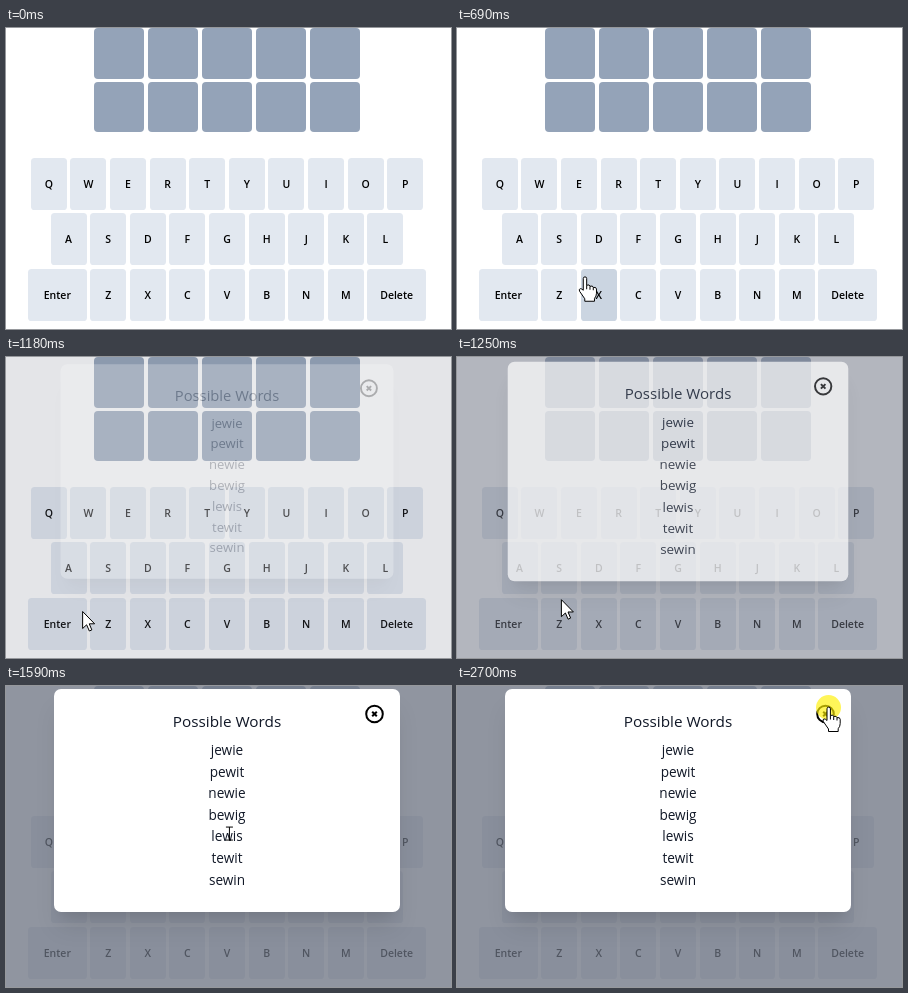
These frames come from a looping animation (445x301 px, 2770 ms). An HTML page:

```html
<!DOCTYPE html>
<html lang="en">
<head>
<meta charset="utf-8">
<title>Possible Words</title>
<style>
  html, body { margin: 0; width: 100%; height: 100%; overflow: hidden; background: #fff; }
  svg { display: block; font-family: "Open Sans", "Noto Sans", sans-serif; text-anchor: middle; }
  .tile { fill: #94a3b8; }
  .key rect { fill: #e2e8f0; }
  .key.hover rect { fill: #cbd5e1; }
  .key text { font-size: 10.5px; font-weight: 600; }
  #dialog { fill: #111827; }
  .title { font-size: 15.3px; font-weight: 500; }
  .word { font-size: 13.6px; }
  .shadow { filter: drop-shadow(0 18px 11px rgba(0, 0, 0, .1)) drop-shadow(0 7px 4px rgba(0, 0, 0, .06)); }
  .icon { fill: none; stroke: #000; stroke-width: 2; }
  #cursor path { fill: #fff; stroke: #000; stroke-linejoin: round; }
</style>
</head>
<body>
<svg width="445" height="301" viewBox="0 0 445 301">
  <g id="board"></g>
  <rect id="backdrop" width="445" height="301" fill="#6b7280"/>
  <g id="dialog">
    <rect class="shadow" x="52.5" y="7.5" width="337" height="214" rx="7"/>
    <rect x="48" y="3" width="346" height="223" rx="7" fill="#fff"/>
    <text class="title" x="221" y="41">Possible Words</text>
    <g id="words"></g>
    <g class="icon">
      <circle cx="368.5" cy="28" r="8.3"/>
      <path d="M366.2 25.7l4.6 4.6m0-4.6l-4.6 4.6"/>
    </g>
  </g>
  <circle id="click" r="12.5" fill="#fff000"/>
  <g id="cursor"><path/></g>
</svg>
<script>
const $ = id => document.getElementById(id);
const clamp = v => Math.min(1, Math.max(0, v));

const LOOP = 2770, START = 200, STEP = 69.4;
const OPEN = 1145, OPENED_AT = 1090;
const CLICKS = [[860, OPENED_AT], [2390, LOOP]];

// time, x, y of the pointer
const PATH = [
  [200, 14, 282], [270, 19, 272], [480, 68, 262], [690, 129, 249], [860, 52, 265],
  [1110, 52, 265], [1245, 106, 242], [1420, 176, 196], [1590, 224, 147], [1800, 257, 60],
  [2010, 325, 30], [2215, 364.5, 20], [2360, 371.5, 21.5], [LOOP, 371.5, 21.5]
];

const SHAPES = {
  arrow: 'M0 0V17L4 13.3 6.7 19.5 9.2 18.4 6.6 12.3H12Z',
  beam: 'M-3.5-6.5H3.5M0-6.5V6.5M-3.5 6.5H3.5',
  hand: 'M-1.5 13V1.3a1.7 1.7 0 0 1 3.4 0V8q3-1.2 3.3 1 3-1 3.3 1.2 3-.8 3.2 1.6V16' +
        'q0 3-2 5.2V24H0V21.5L-5.2 14q-1-2.2 .8-2.6 1.4 0 2.9 1.6M1.9 8v4M5.2 9v3.500M8.500 10.200v2.800'
};

const keys = [];
let board = '';

for (let row = 0; row < 2; row++)
  for (let col = 0; col < 5; col++)
    board += `<rect class="tile" x="${88 + col * 54}" y="${row * 54}" width="50" height="${51 - row}" rx="4"/>`;

[['QWERTYUIOP', 24.8, 130], ['ASDFGHJKL', 44.6, 185], ['<ZXCVBNM>', 22.1, 241]].forEach(([row, x, y]) => {
  for (const c of row) {
    const label = { '<': 'Enter', '>': 'Delete' }[c] || c;
    const w = label === c ? 36 : 58.5;
    board += `<g class="key"><rect x="${Math.round(x)}" y="${y}" width="${Math.round(w)}" height="52" rx="3.6"/>` +
      `<text x="${x + w / 2}" y="${y + 30}">${label}</text></g>`;
    keys.push({ x, y, w });
    x += w + 3.6;
  }
});
$('board').innerHTML = board;
const keyNodes = document.querySelectorAll('.key');

$('words').innerHTML = 'jewie pewit newie bewig lewis tewit sewin'.split(' ')
  .map((word, i) => `<text class="word" x="221" y="${69 + i * 21.6}">${word}</text>`).join('');

function pointerAt(t) {
  const i = Math.max(1, PATH.findIndex(p => p[0] >= t));
  const [t0, x0, y0] = PATH[i - 1], [t1, x1, y1] = PATH[i];
  const k = clamp((t - t0) / (t1 - t0));
  return [x0 + (x1 - x0) * k, y0 + (y1 - y0) * k];
}

function pointerShape(t, x, y, overKey) {
  if (overKey || t > OPENED_AT && Math.hypot(x - 368.5, y - 28) < 11) return 'hand';
  const overWords = Math.abs(x - 221) < 19 && y > 54 && y < 205;
  const overTitle = Math.abs(x - 221) < 56 && y > 24 && y < 47;
  return t > OPENED_AT && (overWords || overTitle) ? 'beam' : 'arrow';
}

function render(t) {
  const [x, y] = pointerAt(t);
  const visible = t >= START;
  const hovered = visible && t < OPENED_AT
    ? keys.findIndex(k => x >= k.x && x < k.x + k.w && y >= k.y && y < k.y + 52) : -1;
  keyNodes.forEach((node, i) => node.classList.toggle('hover', i === hovered));

  const shown = 1 - (1 - clamp((t - OPEN) / 300)) ** 3;
  $('backdrop').setAttribute('opacity', .75 * shown);
  $('dialog').setAttribute('opacity', shown);
  $('dialog').setAttribute('transform', `translate(221 114.5) scale(${.95 + .05 * shown}) translate(-221 -114.5)`);

  const click = CLICKS.find(([from, to]) => t >= from && t < to);
  $('click').setAttribute('opacity', click ? .65 * clamp((t - click[0]) / 200) : 0);
  $('click').setAttribute('transform', `translate(${x} ${y})`);

  $('cursor').setAttribute('opacity', visible ? 1 : 0);
  $('cursor').setAttribute('transform', `translate(${x} ${y})`);
  $('cursor').firstChild.setAttribute('d', SHAPES[pointerShape(t, x, y, hovered >= 0)]);
}

const begin = performance.now();
function tick() {
  const t = (performance.now() - begin) % LOOP;
  render(t < START ? 0 : START + Math.floor((t - START) / STEP) * STEP);
  requestAnimationFrame(tick);
}
tick();
</script>
</body>
</html>
```
